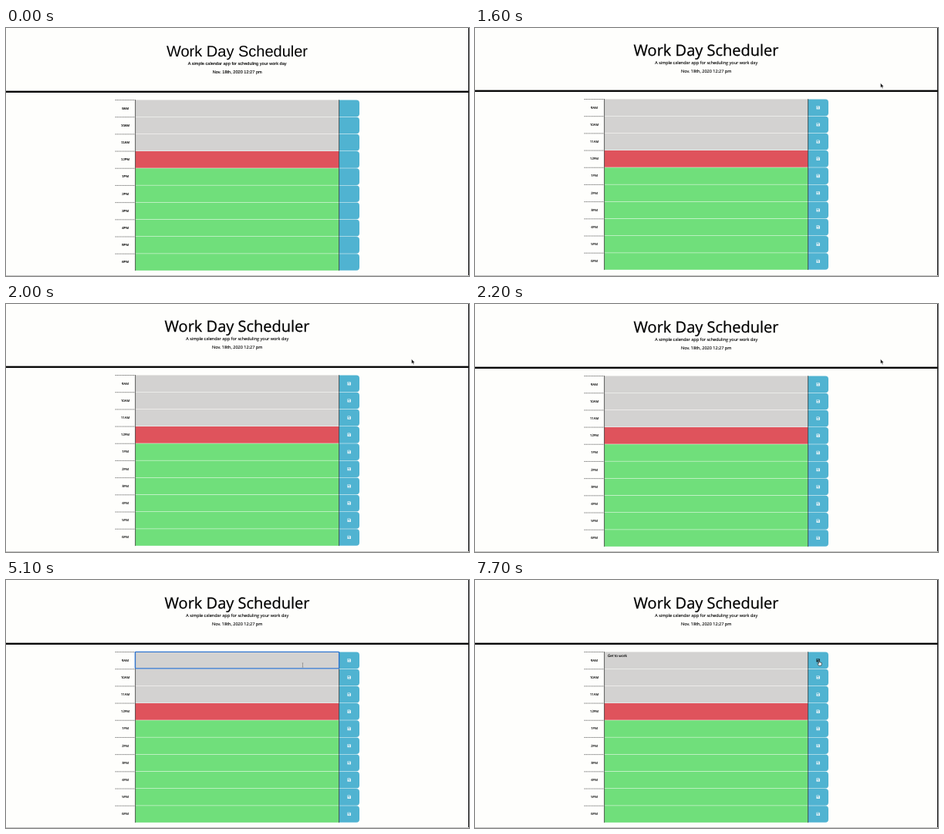
Animation, 600 px wide and 322 px high, one loop 8 s. Source, as an HTML page:

```html
<!DOCTYPE html>
<html lang="en">
<head>
<meta charset="utf-8">
<title>Work Day Scheduler</title>
<style>
  html, body { margin: 0; width: 100%; height: 100%; overflow: hidden; background: #fefefc; }
  svg { display: block; width: 600px; height: 322px; }
  text { font-family: "Open Sans", sans-serif; fill: #000; stroke: #000; stroke-width: .12px; text-anchor: middle; text-rendering: geometricPrecision; }
  .plain text { font-family: "Liberation Sans", Arial, sans-serif; }
  .title { font-size: 20px; stroke-width: .25px; }
  .plain .title { stroke: none; }
  .lead { font-size: 5.53px; }
  .plain .lead { font-size: 5.6px; }
  .hour { font-size: 4.25px; }
  #note { font-size: 4.6px; text-anchor: start; white-space: pre; }
  .plain .icon { display: none; }
  .icon { fill: #e8f4f8; }
  .icon.hot { fill: #16262c; }
</style>
</head>
<body>
<svg id="stage" viewBox="0 0 600 322">
  <rect width="600" height="322" fill="#fefefc"/>
  <g id="page">
    <text class="title" x="299.5" y="37">Work Day Scheduler</text>
    <text class="lead" x="299.7" y="48.4">A simple calendar app for scheduling your work day</text>
    <text class="lead" x="299.7" y="58.5">Nov. 18th, 2020 12:27 pm</text>
    <rect y="81.6" width="600" height="2.3"/>
    <g id="rows"></g>
    <text id="note" x="172" y="100.3"></text>
    <rect id="caret" y="96" width=".6" height="5.2"/>
    <rect id="ring" x="167.4" y="93.3" width="264.2" height="21.6" rx=".8" fill="none" stroke="#2f74cf" stroke-width="1.3"/>
  </g>
  <rect x="599" width="1" height="322" fill="#111"/>
  <rect y="321" width="600" height="1" fill="#c4c4c2"/>
  <path id="arrow" d="M0 0V6L1.4 4.8 2.4 7 3.4 6.5 2.5 4.4H4.2Z" fill="#111" stroke="#fff" stroke-width=".4"/>
  <path id="beam" d="M-.8-2.6H.8M0-2.6V2.6M-.8 2.6H.8" fill="none" stroke="#777" stroke-width=".6"/>
  <path id="hand" d="M-.6 .4Q0-.4 .6 .4V2.6L3.2 3.3V5.2L2.6 7H-.6L-2.2 4.5-1.7 3.8-.6 4.6Z" fill="#fff" stroke="#111" stroke-width=".6"/>
</svg>
<script>
const NS = "http://www.w3.org/2000/svg";
const $ = id => document.getElementById(id);
const LOOP = 8000, STEP = 100;
const TOP = 93.2, PITCH = 22.19, ROWS = 10, NOW = 3;
const LEFT = 167.6, SPLIT = 431.6, RIGHT = 458, ICON_X = 444.7;
const NOTE = "Get to work";
const FONTS_READY = 200, POINTER_IN = 900, FOCUS = 4600, TYPE = 5400, BLUR = 7500;

// Each move eases the pointer to (x, y); sag bends the path downwards.
const MOVES = [
  { at: 1100, end: 1300, x: 525.5, y: 71.5, sag: 0 },
  { at: 2200, end: 3800, x: 387.5, y: 129, sag: 40 },
  { at: 4000, end: FOCUS, x: 384.5, y: 110.5, sag: 0 },
  { at: 6700, end: 7600, x: 446, y: 104.2, sag: 0 }
];

const clamp = (v, lo, hi) => Math.min(hi, Math.max(lo, v));
const easeOut = k => 1 - (1 - k) ** 2;
const rowMid = i => TOP + (i + .5) * PITCH;
const show = (id, on) => $(id).setAttribute("visibility", on ? "visible" : "hidden");

function add(parent, tag, attrs, text = "") {
  const el = document.createElementNS(NS, tag);
  for (const k in attrs) el.setAttribute(k, attrs[k]);
  el.textContent = text;
  parent.append(el);
  return el;
}

function addRow(i) {
  const hour = 9 + i, mid = rowMid(i), y = mid - PITCH / 2, h = PITCH - .5;
  const label = (hour > 12 ? hour - 12 : hour) + (hour < 12 ? "AM" : "PM");
  const fill = i < NOW ? "#d3d2d1" : i === NOW ? "#df535c" : "#70df7b";
  const g = add($("rows"), "g", {});
  add(g, "path", { d: `M141.5 ${y + .3}H${LEFT}`, stroke: "#222", "stroke-width": .6, "stroke-dasharray": "1.4 .7" });
  add(g, "text", { class: "hour", x: 154.6, y: mid + 1.4 }, label);
  add(g, "rect", { x: LEFT, y: y + .25, width: SPLIT - LEFT, height: h, fill });
  add(g, "path", { d: `M${SPLIT} ${y + .25}H${RIGHT - 4}q4 0 4 4v${h - 8}q0 4-4 4H${SPLIT}Z`, fill: "#50b3d1" });
  add(g, "path", { d: `M${LEFT} ${y}v${PITCH}M${SPLIT} ${y}v${PITCH}`, stroke: "#222", "stroke-width": .7 });
  return add(g, "path", {
    class: "icon", "fill-rule": "evenodd",
    transform: `translate(${ICON_X} ${mid - .1})`,
    d: "M-2.2-2.2H1.3L2.2-1.3V2.2H-2.2ZM-1.5-1.6V-.4H.9V-1.6ZM-.7 .9a.7 .7 0 1 0 1.4 0a.7 .7 0 1 0-1.4 0Z"
  });
}
const icons = Array.from({ length: ROWS }, (_, i) => addRow(i));

function pointer(t) {
  let x = 446, y = 64;
  for (const m of MOVES) {
    const k = easeOut(clamp((t - m.at) / (m.end - m.at), 0, 1));
    x += (m.x - x) * k;
    y += (m.y - y) * k + m.sag * Math.sin(Math.PI * k);
  }
  return [x, y];
}

function pointerKind(x, y) {
  const inGrid = y > TOP && y < TOP + PITCH * ROWS && x > LEFT && x < RIGHT;
  return !inGrid ? "arrow" : x < SPLIT ? "beam" : "hand";
}

// One short nudge down and back.
const scroll = t => Math.round(-2 * Math.sin(Math.PI * clamp((t - 1500) / 600, 0, 1)));

function draw(t) {
  $("stage").classList.toggle("plain", t < FONTS_READY);
  $("page").setAttribute("transform", `translate(0 ${scroll(t)})`);

  const typed = clamp(Math.floor((t - TYPE) / STEP) + 1, 0, NOTE.length);
  const lastKey = typed ? TYPE + (typed - 1) * STEP : FOCUS;
  const focused = t >= FOCUS && t < BLUR;
  $("note").textContent = NOTE.slice(0, typed);
  show("ring", focused);
  show("caret", focused && (t - lastKey) % 1000 < 500);
  $("caret").setAttribute("x", 172 + (typed ? $("note").getComputedTextLength() : 0));

  const [x, y] = pointer(t);
  const kind = pointerKind(x, y);
  for (const id of ["arrow", "beam", "hand"]) show(id, t >= POINTER_IN && id === kind);
  $(kind).setAttribute("transform", `translate(${x} ${y})`);

  icons.forEach((icon, i) => {
    icon.classList.toggle("hot", Math.hypot(x - ICON_X, y - rowMid(i)) < 2.8);
  });
}

const start = performance.now();
function tick() {
  const t = (performance.now() - start) % LOOP;
  draw(Math.floor(t / STEP) * STEP);
  requestAnimationFrame(tick);
}
tick();
</script>
</body>
</html>
```
